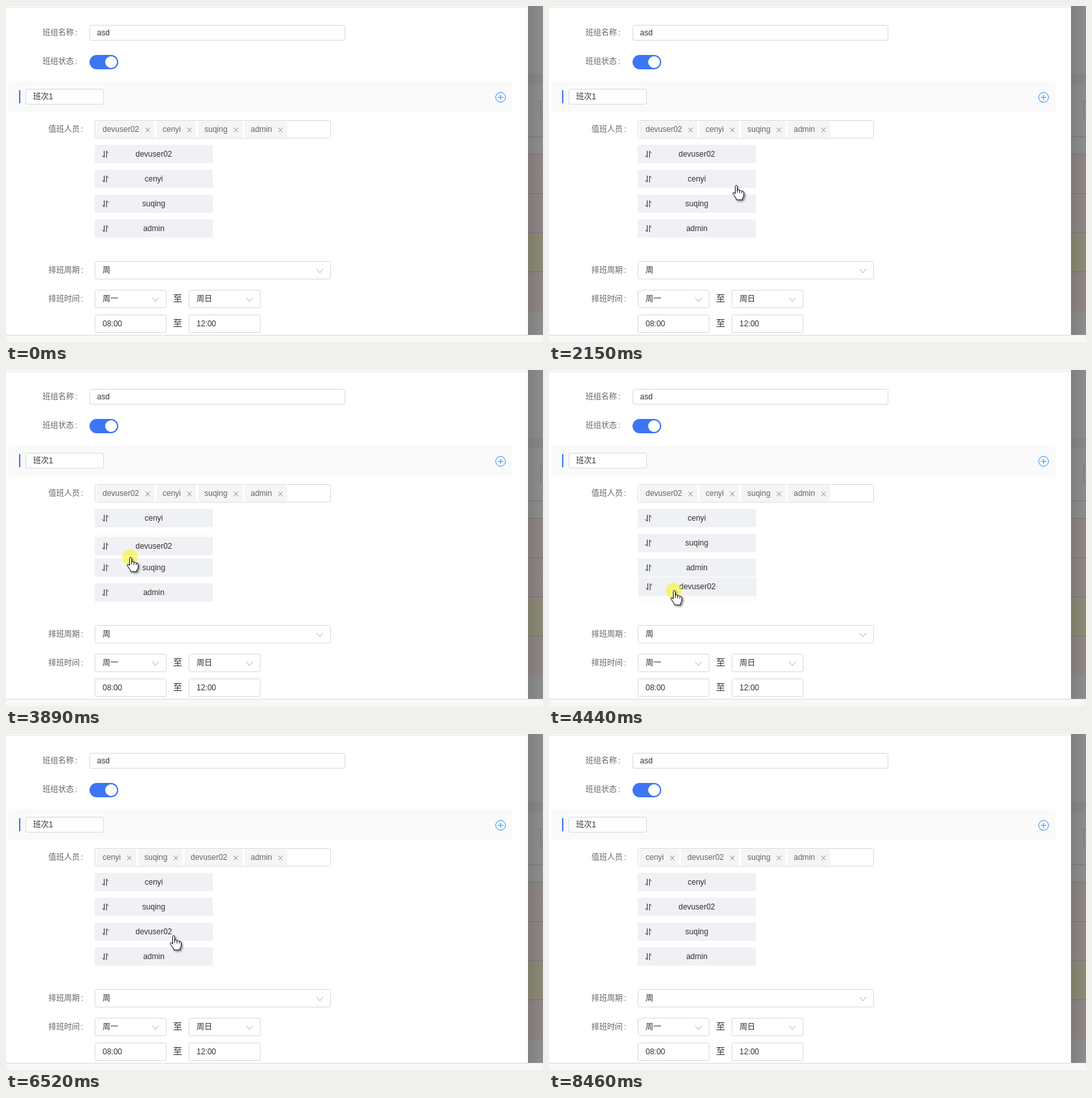
Animation of 823x515 px, one loop 8.86 s. Source, as an HTML page:

```html
<!DOCTYPE html>
<html lang="zh-CN">
<head>
<meta charset="utf-8">
<style>
  html, body { margin: 0; width: 100%; height: 100%; overflow: hidden; background: #fff; }
  svg { display: block; width: 823px; height: 515px; }
  text { font: 12px "Liberation Sans", "Noto Sans CJK SC", "Noto Sans CJK", sans-serif; fill: #333; }
  .label { fill: #666; }
  .to { font-size: 14px; }
  .box { fill: #fff; stroke: #d9d9d9; }
  .line { fill: none; stroke: #222; }
  .row text { text-anchor: middle; }
  #cursor path { stroke: #111; stroke-linejoin: round; }
  #cursor g { filter: drop-shadow(2px 2px 1.5px rgba(0, 0, 0, .45)); }
</style>
</head>
<body>
<svg viewBox="0 0 823 515">
  <defs>
    <linearGradient id="shade">
      <stop stop-opacity=".1"/><stop offset="1" stop-opacity="0"/>
    </linearGradient>
  </defs>
  <g id="page"></g>
  <g id="tags"></g>
  <g id="rows"></g>
  <g id="cursor">
    <circle id="halo" cy="-1" r="12" fill="#faf514" opacity=".55"/>
    <g id="arrow"><path fill="#fff" d="M.5.5V16.5L4 13L6.5 18.5L9 17.5L6.7 12H11.5Z"/></g>
    <g id="hand" transform="translate(1 -1)">
      <path fill="#fff" d="M-1.5 13V1.5Q-1.5 0 0 0T1.5 1.5V7Q4.5 5.5 5 8Q8 7 8.5 9Q11.5 8 11.5 11V15Q11.5 17.5 9.5 19.5V22H0V20L-5 13Q-5.5 10.5 -3.5 10.5Z"/>
      <path fill="none" d="M1.5 7V11M5 8V12M8.5 9V12"/>
    </g>
  </g>
</svg>
<script>
const $ = id => document.getElementById(id);
const rect = (x, y, w, h, fill, rx = 0) =>
  `<rect x="${x}" y="${y}" width="${w}" height="${h}" fill="${fill}" rx="${rx}"/>`;
const box = (x, y, w, h) =>
  `<rect class="box" x="${x + .5}" y="${y + .5}" width="${w - 1}" height="${h - 1}" rx="2"/>`;
const text = (x, y, s, cls = '') => `<text class="${cls}" x="${x}" y="${y}">${s}</text>`;
const label = (x, y, s) => text(x, y, s, 'label') + text(x + 50, y, ':', 'label');
const line = (d, color) => `<path class="line" d="${d}" style="stroke:${color}"/>`;
const chevron = (x, y) => line(`M${x - 5} ${y - 3}l5 6l5 -6`, '#b0b0b0');

// Dimmed page at the right edge: a table with 60px rows, one highlighted
const tableRows = [0, 1, 2, 3].map(i => {
  const y = 228 + i * 60;
  return rect(800, y, 23, 60, i === 2 ? '#8c8975' : '#8d8684') + rect(800, y - 1, 23, 1, '#777');
}).join('');

$('page').innerHTML =
  rect(0, 0, 800, 2, '#f8f8f8') + rect(0, 2, 800, 1, '#ececec') +
  rect(800, 0, 23, 515, '#8d8d8d') + rect(800, 104, 23, 16, '#878787') +
  rect(800, 200, 23, 1, '#757575') + tableRows +
  line('M824 145.5H819.5V172.5H824', '#757575') +
  rect(800, 0, 23, 515, 'url(#shade)') +
  label(56, 45, '班组名称') + box(128, 29, 392, 24) + text(139.5, 45, 'asd') +
  label(56, 89, '班组状态') + rect(128, 75, 44, 22, '#3d76f5', 11) + rect(152, 77, 18, 18, '#fff', 9) +
  rect(4, 115, 772, 48, '#fafafa') + rect(20, 129, 2, 20, '#3a76f0') +
  box(30, 127, 120, 24) + text(41.5, 143, '班次1') +
  '<circle class="line" cx="758" cy="140" r="7.5" style="stroke:#2f8ff5"/>' +
  line('M754 140H762M758 136V144', '#2f8ff5') +
  label(65, 193, '值班人员') + box(136, 175, 362, 28) +
  label(65, 409, '排班周期') + box(136, 391, 362, 28) + text(148, 409, '周') + chevron(481, 406) +
  label(65, 453, '排班时间') +
  [[136, '周一', '08:00'], [280, '周日', '12:00']].map(([x, day, hour]) =>
    box(x, 435, 110, 28) + text(x + 12, 453, day) + chevron(x + 93, 450) +
    box(x, 473, 110, 28) + text(x + 12, 491, hour)).join('') +
  text(256, 453, '至', 'to') + text(256, 491, '至', 'to') +
  rect(0, 504, 823, 11, '#f7f7f7') + rect(0, 504, 823, 1, '#dcdcdc');

const names = ['devuser02', 'cenyi', 'suqing', 'admin'];
const row = name => `<g class="row">${rect(136, 0, 181, 28, '#f0f1f4', 1)}${text(226.5, 18, name)}
  ${line('M147.5 16L150.5 19V9M157 12.5L154 9.5V19.5', '#222')}</g>`;
$('rows').innerHTML = names.map(row).join('') + row(names[0]);
const rows = [...$('rows').children];
const dragged = rows.pop();

$('tags').innerHTML = names.map(name => `<g>${text(9, 193, name, 'label')}</g>`).join('');
const tags = [...$('tags').children];
const tagWidths = tags.map(tag => {
  const w = tag.firstChild.getComputedTextLength() + 32;
  tag.insertAdjacentHTML('afterbegin',
    `<rect x=".5" y="177.5" width="${w - 1}" height="23" rx="2" fill="#f5f5f5" stroke="#f0f0f0"/>`);
  tag.insertAdjacentHTML('beforeend', line(`M${w - 13.5} 186.5l7 7m0 -7l-7 7`, '#888'));
  return w;
});

const LOOP = 8860, SHOWN = 70, HIDDEN = 8460;
const TOP = 213, PITCH = 38;
const GRAB_DELAY = 140, DRAG_LAG = 80;

// Pointer moves: [start, end, x, y]
const moves = [
  [70, 200, 830, 440], [560, 1210, 783, 328],
  [1940, 2150, 286, 276], [2150, 2700, 190, 231],
  [2890, 3370, 190, 265], [3760, 4570, 191, 341],
  [4850, 4970, 197, 341], [5310, 5520, 198, 318], [5620, 5980, 203, 314],
  [6260, 6380, 261, 314], [6480, 6660, 249, 303], [6720, 7140, 249, 270],
  [7740, 8120, 700, 395], [8120, 8460, 755, 482]
];
const click = { press: 1410, drop: 1540 };
const drags = [
  { press: 2750, drop: 4700, from: 0, to: 3 },
  { press: 5170, drop: 5910, from: 3, to: 2 },
  { press: 6660, drop: 7540, from: 2, to: 1 }
];

const order = slot => [1, 2, 3].toSpliced(slot, 0, 0);
const show = (el, on) => el.setAttribute('visibility', on ? 'visible' : 'hidden');
const move = (el, x, y) => el.setAttribute('transform', `translate(${x} ${y})`);
const easeOut = k => 1 - (1 - k) ** 2;

function pointer(t) {
  let x = 803, y = 500;
  for (const [start, end, toX, toY] of moves) {
    if (t < start) break;
    const k = easeOut(Math.min(1, (t - start) / (end - start)));
    x += (toX - x) * k;
    y += (toY - y) * k;
  }
  return [Math.round(x), Math.round(y)];
}

function draw(t) {
  const pressed = [click, ...drags].some(d => t >= d.press && t < d.drop);
  const drag = drags.find(d => t >= d.press + GRAB_DELAY && t < d.drop);
  const dropped = drags.findLast(d => t >= d.drop)?.to ?? 0;
  let slot = dropped;

  if (drag) {
    const [px, py] = pointer(drag.press);
    const [x, y] = pointer(t - DRAG_LAG);
    const offset = drag.from * PITCH + y - py;
    slot = Math.round(offset / PITCH);
    move(dragged, x - px, TOP + offset);
  }
  show(dragged, drag);
  rows[0].setAttribute('opacity', drag ? .2 : 1);
  order(slot).forEach((id, i) => move(rows[id], 0, TOP + i * PITCH));

  let left = 139;
  for (const id of order(dropped)) {
    move(tags[id], Math.round(left), 0);
    left += tagWidths[id] + 4;
  }

  const [x, y] = pointer(t);
  const visible = t >= SHOWN && t < HIDDEN;
  const overRows = x > 136 && x < 317 && y > TOP && y < 355;
  move($('cursor'), x, y);
  show($('hand'), visible && overRows);
  show($('arrow'), visible && !overRows);
  show($('halo'), pressed);
}

const begin = performance.now();
function tick() {
  draw((performance.now() - begin) % LOOP);
  requestAnimationFrame(tick);
}
tick();
</script>
</body>
</html>
```
